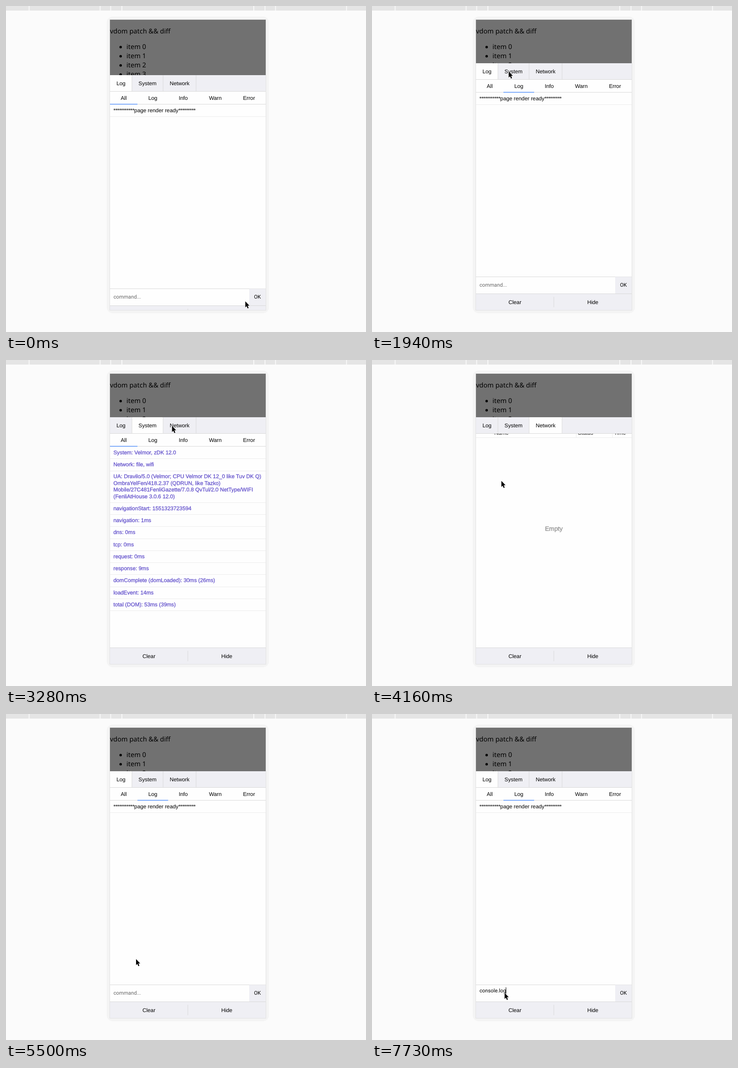
An HTML page that plays this animation: 786x712 px, repeating every 8000 ms.

```html
<!DOCTYPE html>
<html>
<head>
<meta charset="utf-8">
<style>
  html, body { margin: 0; width: 786px; height: 712px; overflow: hidden; background: #fbfbfb; }
  svg { display: block; }
  text { font: 11.79px "Liberation Sans", Arial, sans-serif; text-rendering: geometricPrecision; white-space: pre; }
  .page { font: 14.5px "Noto Sans", sans-serif; }
  .input { font: 11.3px Roboto, sans-serif; }
  .stars { letter-spacing: -.44px; }
  .system { fill: #5b49c9; stroke: #5b49c9; stroke-width: .25px; }
  .empty { font-size: 13.6px; fill: #999; stroke: #999; stroke-width: .45px; }
  .mid { text-anchor: middle; }
</style>
</head>
<body>
<svg id="stage" width="786" height="712"></svg>
<script>
const LOOP = 8000, STEP = 148.65;
const LEFT = 227, WIDTH = 340, MID = LEFT + WIDTH / 2;
const BAR = '#efeff4', LINE = '#d9d9d9', PALE = '#ececec', WHITE = '#fefefe';

const rect = (x, y, w, h, fill, more = '') =>
  `<rect x="${x}" y="${y}" width="${w}" height="${h}" fill="${fill}" ${more}/>`;
const rule = (y, color) => rect(LEFT, Math.round(y), WIDTH, 1, color);
const text = (x, y, s, cls = '', more = '') =>
  `<text x="${x}" y="${y}" class="${cls}" ${more}>${s.replace(/&/g, '&amp;')}</text>`;
const group = (id, body) => `<g id="${id}">${body}</g>`;

// Lays labelled cells side by side from the left edge of the screen.
function row(names, widths) {
  let x = LEFT;
  return names.map((name, i) => ({ name, x, w: widths[i], end: x += widths[i] }));
}
const labels = (cells, y) => cells.map(c => text(c.x + c.w / 2, y, c.name, 'mid')).join('');

const tabs = row(['Log', 'System', 'Network'], [48, 68, 72]);
const filters = row(['All', 'Log', 'Info', 'Warn', 'Error'], [60, 67, 66, 74, 73]);
const systemRows = `System: Velmor, zDK 12.0
Network: file, wifi
UA: Dravilo/5.0 (Velmor; CPU Velmor DK 12_0 like Tuv DK Q)|OmbraYelFen/418.2.37 (QDRUN, like Tazko)|Mobile/27C481FenliGazette/7.0.8 QvTul/2.0 NetType/WIFI|(FenliAtHouse 3.0.6 12.0)
navigationStart: 1551323723594
navigation: 1ms
dns: 0ms
tcp: 0ms
request: 0ms
response: 9ms
domComplete (domLoaded): 30ms (26ms)
loadEvent: 14ms
total (DOM): 53ms (39ms)`.split('\n').map(s => s.split('|'));

// The gaps in the strip mirror around the middle of the screen.
const topBar = () => rect(0, 0, 786, 10, '#e5e5e5') +
  [144, 168.5, 191.5, 346.5].flatMap(d => [MID - d, MID + d])
    .map(x => rect(x - .9, 0, 1.8, 10, '#fbfbfb')).join('');

function page() {
  let out = rect(LEFT, 30, WIDTH, 634, '#717171') + text(LEFT, 60, 'vdom patch && diff', 'page');
  for (let i = 0; i < 4; i++) {
    const y = 94.2 + 20 * i;
    out += `<circle cx="250.3" cy="${y - 4.4}" r="2.7"/>` + text(263, y, 'item ' + i, 'page');
  }
  return out;
}

function systemList() {
  let y = 189, out = '';
  for (const lines of systemRows) {
    lines.forEach((s, i) => out += text(234.5, y + 16.8 + 14.5 * i, s, 'system'));
    y += 26.25 + 14.4 * (lines.length - 1);
    out += rule(y, PALE);
  }
  return out;
}

const stars = n => `<tspan class="stars">${'*'.repeat(n)}</tspan>`;
const logList = `<text x="234.5" y="205.8">${stars(11)}page render ready${stars(9)}</text>` + rule(215, PALE);

const command =
  rule(591, LINE) + rect(531, 591.5, 36, 37, BAR) + text(549, 613.3, 'OK', 'input mid') +
  text(234.7, 613, 'command...', 'input', 'id="hint" fill="#666"') +
  text(234.7, 608, '', 'input', 'id="typed"') +
  rect(0, 597, 1, 14, '#000', 'id="caret"');

const network =
  rule(182, PALE) + text(267, 176.3, 'Name') + text(MID, 385.5, 'Empty', 'empty mid') +
  [['Status', 445.5], ['Time', 524.5]]
    .map(([s, x]) => rect(x, 161, 1, 21, PALE) + text(x + 4, 176.3, s)).join('');

const tabBar =
  rect(LEFT, 125, WIDTH, 36, BAR) + rect(0, 125, 0, 36, WHITE, 'id="picked"') + rule(160, LINE) +
  labels(tabs, 146.8) + tabs.map(c => rect(c.end - .5, 125, 1, 35, LINE)).join('');

const filterBar = rule(188, LINE) + labels(filters, 178.8) + rect(0, 187.8, 0, 1.3, '#3e82f7', 'id="underline"');

const footer =
  rect(LEFT, 628, WIDTH, 62, BAR) + rule(628, LINE) + rect(MID - .5, 635, 1, 23, LINE) +
  labels(row(['Clear', 'Hide'], [WIDTH / 2, WIDTH / 2]), 650.7);

const panel =
  rect(LEFT, 125, WIDTH, 540, WHITE) +
  group('network', network) + group('filters', filterBar) + group('system', systemList()) +
  group('log', logList + command) + tabBar + footer;

const $ = id => document.getElementById(id);
$('stage').innerHTML =
  `<clipPath id="screen">${rect(LEFT, 30, WIDTH, 634)}</clipPath>` +
  topBar() + rect(220, 23, 354, 648, '#f4f4f4', 'rx="13"') +
  `<g clip-path="url(#screen)">${page()}${group('panel', panel)}</g>` +
  rect(LEFT - .5, 29.5, WIDTH + 1, 635, 'none', 'stroke="#e2e2e2"') +
  '<path id="cursor" d="M0 0V13.2L2.9 10.5 5 15.4 7.2 14.4 5.1 9.6H9Z" stroke="#fff" stroke-width="1" paint-order="stroke"/>';

// Steps at which something is clicked or typed.
const FILTER = 9, SYSTEM = 15, NETWORK = 23, LOG = 34, FOCUS = 39, TYPE = 43;

const moves = [
  { from: 0, to: 8, x: 306, y: 171 },
  { from: 11, to: 13, x: 299, y: 143 },
  { from: 16, to: 18, x: 346, y: 144 },
  { from: 19, to: 22, x: 363, y: 144 },
  { from: 24, to: 28, x: 283, y: 264 },
  { from: 30, to: 33, x: 254.5, y: 137 },
  { from: 34, to: 38, x: 290, y: 609 }
];

function cursorAt(step) {
  let x = 523, y = 645;
  for (const m of moves) {
    const p = Math.min(1, Math.max(0, (step - m.from) / (m.to - m.from)));
    const ease = p * p * (3 - 2 * p);
    x += (m.x - x) * ease;
    y += (m.y - y) * ease;
  }
  return [x - .5, y];
}

// A short push up, then a pull down that springs back.
function scrollAt(step) {
  if (step < 27) return 0;
  return step < 29 ? -13 : 212 * Math.exp(-.75 * (step - 29));
}

const set = (id, attrs) => { for (const k in attrs) $(id).setAttribute(k, attrs[k]); };
const show = (id, on) => set(id, { visibility: on ? 'visible' : 'hidden' });
const move = (id, x, y) => set(id, { transform: `translate(${x} ${y})` });
const span = (id, cell) => set(id, { x: cell.x, width: cell.w });

function draw(ms) {
  const step = Math.floor((ms + 8) / STEP);
  const tab = step < SYSTEM || step >= LOG ? 0 : step < NETWORK ? 1 : 2;
  const typing = step >= TYPE;

  move('panel', 0, step ? 0 : 26);
  move('network', 0, scrollAt(step));
  move('cursor', ...cursorAt(step));
  show('log', tab === 0);
  show('system', tab === 1);
  show('network', tab === 2);
  show('filters', tab < 2);
  span('picked', tabs[tab]);
  span('underline', filters[tab === 0 && step >= FILTER ? 1 : 0]);

  show('hint', tab === 0 && step < FOCUS);
  show('caret', step === FOCUS || typing);
  const count = typing ? Math.round(1 + (step - TYPE) * 10 / 9) : 0;
  $('typed').textContent = 'console.log'.slice(0, count);
  set('caret', { x: Math.round(234.3 + (count ? $('typed').getComputedTextLength() : 0)) });
}

const start = performance.now();
function tick() {
  draw((performance.now() - start) % LOOP);
  requestAnimationFrame(tick);
}
tick();
</script>
</body>
</html>
```
